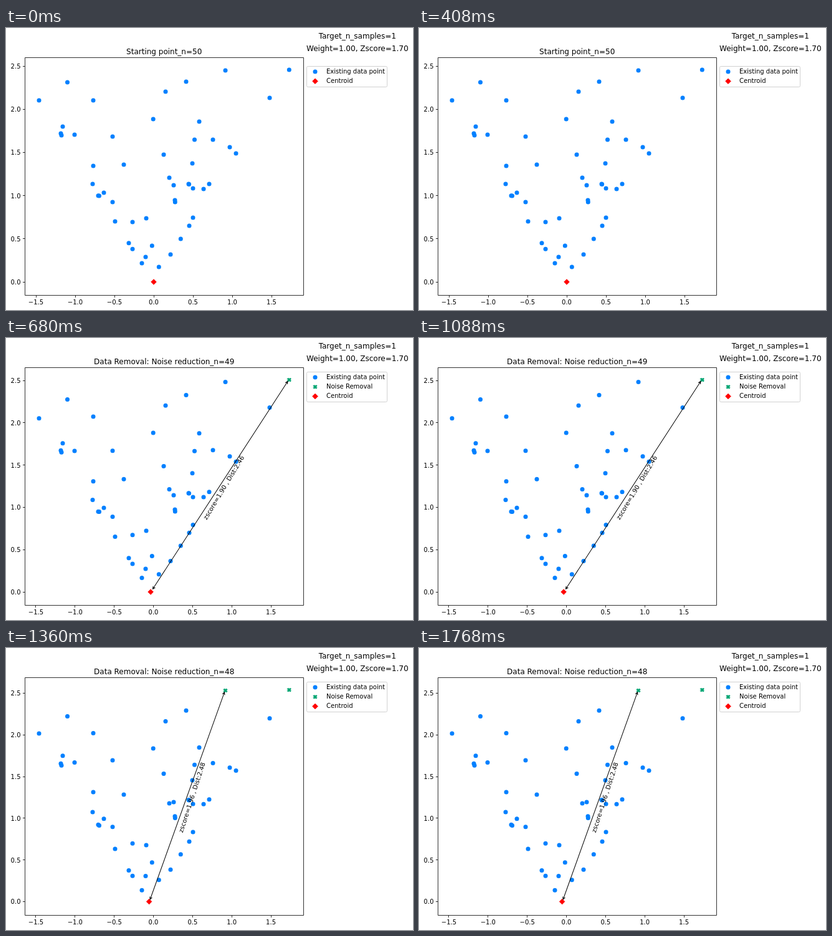
Recreate the animation shown at these times as an HTML page. Size 653 by 452 pixels, loop 2040 ms.

```html
<!DOCTYPE html>
<html lang="en">
<head>
<meta charset="utf-8">
<title>Noise reduction</title>
<style>
  html, body { margin: 0; width: 100%; height: 100%; overflow: hidden; background: #fff; }
  svg { display: block; font: 10px "DejaVu Sans", sans-serif; }
  .title { font-size: 12px; }
</style>
</head>
<body>
<svg id="stage" width="653" height="452" viewBox="0 0 653 452"></svg>
<script>
const STEP = 680;
const BLUE = '#0080ff', GREEN = '#00a572', RED = '#f00';
const X0 = 237, X_UNIT = 126, Y_UNIT = 138.4;

// Pixel offsets from the first centroid; the sign of the height tells the side of the diagonal.
// The first two are the points that get removed.
const points = [
  [217.3, 340], [115, 339],
  [-184, -291], [-138.5, -320], [-97, -291], [19, -305], [52, -321], [186, -295],
  [-146, 249], [-149, 238], [-148, 235], [-127, 236], [-66, 233], [-.8, -261],
  [73, -257], [65.5, -228], [95, -228], [122, -216], [132, 206], [16, 204],
  [-48, -188], [-97, 186], [62, 190], [25, -167], [32, 155], [-98, 157],
  [56, 157], [56.6, 156.6], [63, 150], [89, 157], [80, 149], [-80, 143],
  [-89, 138], [-87.5, -138], [-66, 128], [34, 131], [34.3, 128], [-62, 97],
  [-34, 96], [-12, -102], [63, 103], [57, -90], [43.3, -69], [-40, 62],
  [-34, 52.6], [-2.7, 58], [-13, 40], [27, -44], [8.3, 24], [-19, -30]
].map(([u, h]) => {
  const x = u / X_UNIT, y = h / Y_UNIT;
  return { px: X0 + u, x, w: Math.sign(h) * Math.sqrt(Math.max(0, y * y - 2 * x * x)) };
});

const scenes = [
  { x0: 237, xUnit: 126, y0: 407, yUnit: Y_UNIT },
  { x0: 236.5, xUnit: 125.7, y0: 407, yUnit: 135.6,
    arrow: [235.5, 402.3, 452, 69.5], note: 'zscore=1.90 , Dist:2.46', at: [349.5, 240], turn: -59 },
  { x0: 236.5, xUnit: 125.7, y0: 406.5, yUnit: 133.6,
    arrow: [231.2, 403, 350.5, 70.8], note: 'zscore=1.96 , Dist:2.48', at: [298.5, 239.5], turn: -72 }
];

const text = (x, y, s, anchor = 'middle', extra = '') =>
  `<text x="${x}" y="${y}" text-anchor="${anchor}" ${extra}>${s}</text>`;
const title = (x, y, s) => text(x, y, s, 'middle', 'class="title"');
const path = (d, extra = '') => `<path d="${d}" fill="none" stroke="#000" ${extra}/>`;
const shape = (x, y, d, color) =>
  `<path transform="translate(${x} ${y})" d="${d}" fill="${color}" stroke="${color}"/>`;

const dot = (x, y) => `<circle cx="${x}" cy="${y}" r="3.5" fill="${BLUE}"/>`;
const diamond = (x, y) => shape(x, y, 'M0-4.24L4.24 0 0 4.24-4.24 0Z', RED);
const cross = (x, y) => shape(x, y,
  'M-1.5-3L0-1.5 1.5-3 3-1.5 1.5 0 3 1.5 1.5 3 0 1.5-1.5 3-3 1.5-1.5 0-3-1.5Z', GREEN);

function arrow([x1, y1, x2, y2]) {
  const angle = Math.atan2(y2 - y1, x2 - x1) * 180 / Math.PI;
  const length = Math.hypot(x2 - x1, y2 - y1);
  return path(`M0 0H${length}M4-2L0 0 4 2M${length - 4}-2l4 2-4 2`,
    `transform="translate(${x1} ${y1}) rotate(${angle})"`);
}

function axes({ x0, xUnit, y0, yUnit }) {
  const snap = v => Math.floor(v) + .5;
  let marks = 'M30.5 47.5H477.5V428.5H30.5Z', labels = '';
  for (let i = -3; i <= 3; i++) {
    const x = x0 + i / 2 * xUnit;
    marks += `M${snap(x)} 428.5v3.5`;
    labels += text(x, 443.3, (i < 0 ? '\u2212' : '') + Math.abs(i / 2).toFixed(1));
  }
  for (let i = 0; i <= 5; i++) {
    const y = y0 - i / 2 * yUnit;
    marks += `M30.5 ${snap(y)}h-3.5`;
    labels += text(23.5, y + 3.9, (i / 2).toFixed(1), 'end');
  }
  return path(marks, 'stroke-opacity=".8"') + labels;
}

function legend(removed) {
  const rows = [[dot, 'Existing data point'], [cross, 'Noise Removal'], [diamond, 'Centroid']]
    .filter(([mark]) => removed || mark !== cross);
  const top = removed ? 54.5 : 61.5;
  return `<rect x="482.5" y="${top}" width="129" height="${removed ? 48 : 33}" rx="2" fill="#fff" stroke="#ccc" stroke-opacity=".9"/>` +
    rows.map(([mark, label], i) => {
      const y = top + 8.6 + i * 15.2;
      return mark(496, y) + text(514, y + 2.9, label, 'start');
    }).join('');
}

function draw(removed) {
  const scene = scenes[removed], left = points.length - removed;
  const centre = key => -points.slice(0, removed).reduce((sum, p) => sum + p[key], 0) / left;
  const cx = centre('x'), cw = centre('w');
  const height = p => scene.y0 - scene.yUnit * Math.sqrt(2 * (p.x - cx) ** 2 + (p.w - cw) ** 2);

  let out = points.slice(removed).map(p => dot(p.px, height(p))).join('');
  out += points.slice(0, removed).map(p => cross(p.px, height(p))).join('');
  out += diamond(scene.x0 + cx * scene.xUnit, scene.y0) + axes(scene);
  if (removed) {
    out += arrow(scene.arrow);
    out += text(0, 3.3, scene.note, 'middle',
      `transform="translate(${scene.at}) rotate(${scene.turn})"`);
  }
  out += title(253.7, 41.5, (removed ? 'Data Removal: Noise reduction' : 'Starting point') + '_n=' + left);
  out += title(563.8, 17, 'Target_n_samples=1') + title(563.8, 37, 'Weight=1.00, Zscore=1.70');
  return out + legend(removed);
}

const stage = document.getElementById('stage');
let shown = -1;
function tick() {
  const now = Math.floor(performance.now() / STEP) % scenes.length;
  if (now !== shown) stage.innerHTML = draw(shown = now);
  requestAnimationFrame(tick);
}
tick();
</script>
</body>
</html>
```
